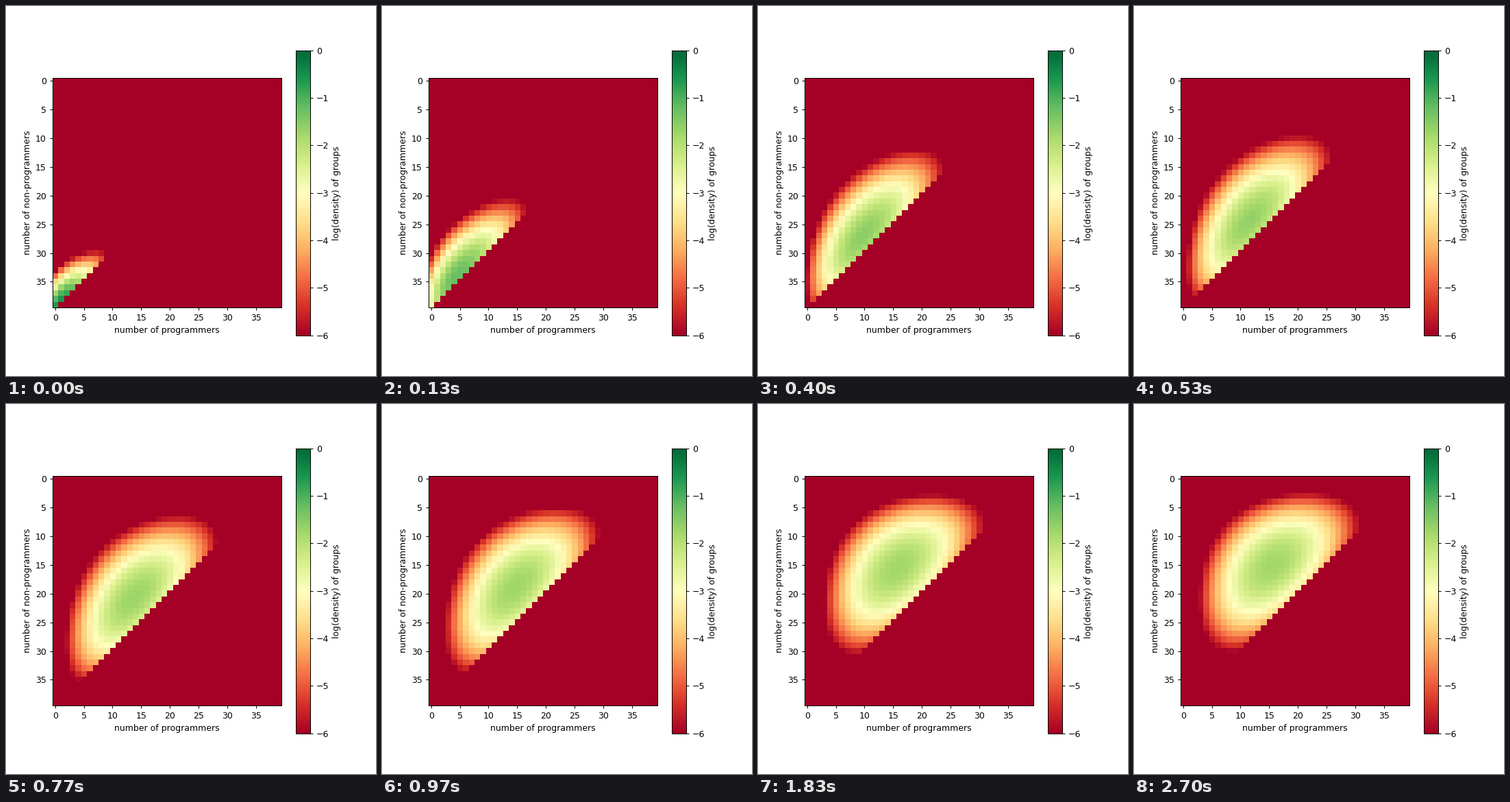
Animation of 540x540 px, one loop 8000 ms. Source, as a matplotlib script:

```python
import numpy as np
import matplotlib.pyplot as plt
from matplotlib.animation import FuncAnimation

SIZE = 40                  # states 0..39 for each kind of member
FRAMES, INTERVAL = 250, 32
STEP, SUBSTEPS = 0.033, 8  # model time per frame

# Rates: joining per free seat, learning to program, leaving
SEATS, JOIN, LEARN = 48, 1.04, 0.88
QUIT_NON, QUIT_PROG = 0.32, 0.87
FLOOR = -6

non, prog = np.mgrid[0:SIZE, 0:SIZE]
total = non + prog
join_rate = np.where(total < SIZE - 1, JOIN * (SEATS - total), 0)
join_rate[total > SIZE - 1] = 0

# (rate, change of non-programmers, change of programmers)
EVENTS = [
    (join_rate, 1, 0),
    (LEARN * non, -1, 1),
    (QUIT_NON * non, -1, 0),
    (QUIT_PROG * prog, 0, -1),
]


def derivative(density):
    change = np.zeros_like(density)
    for rate, d_non, d_prog in EVENTS:
        flow = rate * density
        change += np.roll(flow, (d_non, d_prog), axis=(0, 1)) - flow
    return change


def advance(density):
    """Runge-Kutta integration over one frame."""
    h = STEP / SUBSTEPS
    for _ in range(SUBSTEPS):
        k1 = derivative(density)
        k2 = derivative(density + h / 2 * k1)
        k3 = derivative(density + h / 2 * k2)
        k4 = derivative(density + h * k3)
        density = density + h / 6 * (k1 + 2 * k2 + 2 * k3 + k4)
    return density


def simulate():
    """Log densities, starting with full groups of non-programmers."""
    density = np.zeros((SIZE, SIZE))
    density[SIZE - 1, 0] = 1
    history = []
    for _ in range(FRAMES):
        density = advance(density)
        history.append(np.log10(np.maximum(density, 10.0 ** FLOOR)))
    return history


history = simulate()

plt.rcParams["font.family"] = "DejaVu Sans"
fig, ax = plt.subplots(figsize=(6, 6), dpi=90)
image = ax.imshow(history[0], cmap="RdYlGn", vmin=FLOOR, vmax=0)
ax.set_xlabel("number of programmers")
ax.set_ylabel("number of non-programmers")
fig.colorbar(image, ax=ax, label="log(density) of groups")


def update(i):
    image.set_data(history[i])
    return [image]


anim = FuncAnimation(fig, update, frames=FRAMES, interval=INTERVAL,
                     repeat=True, repeat_delay=0)
plt.show()
```
